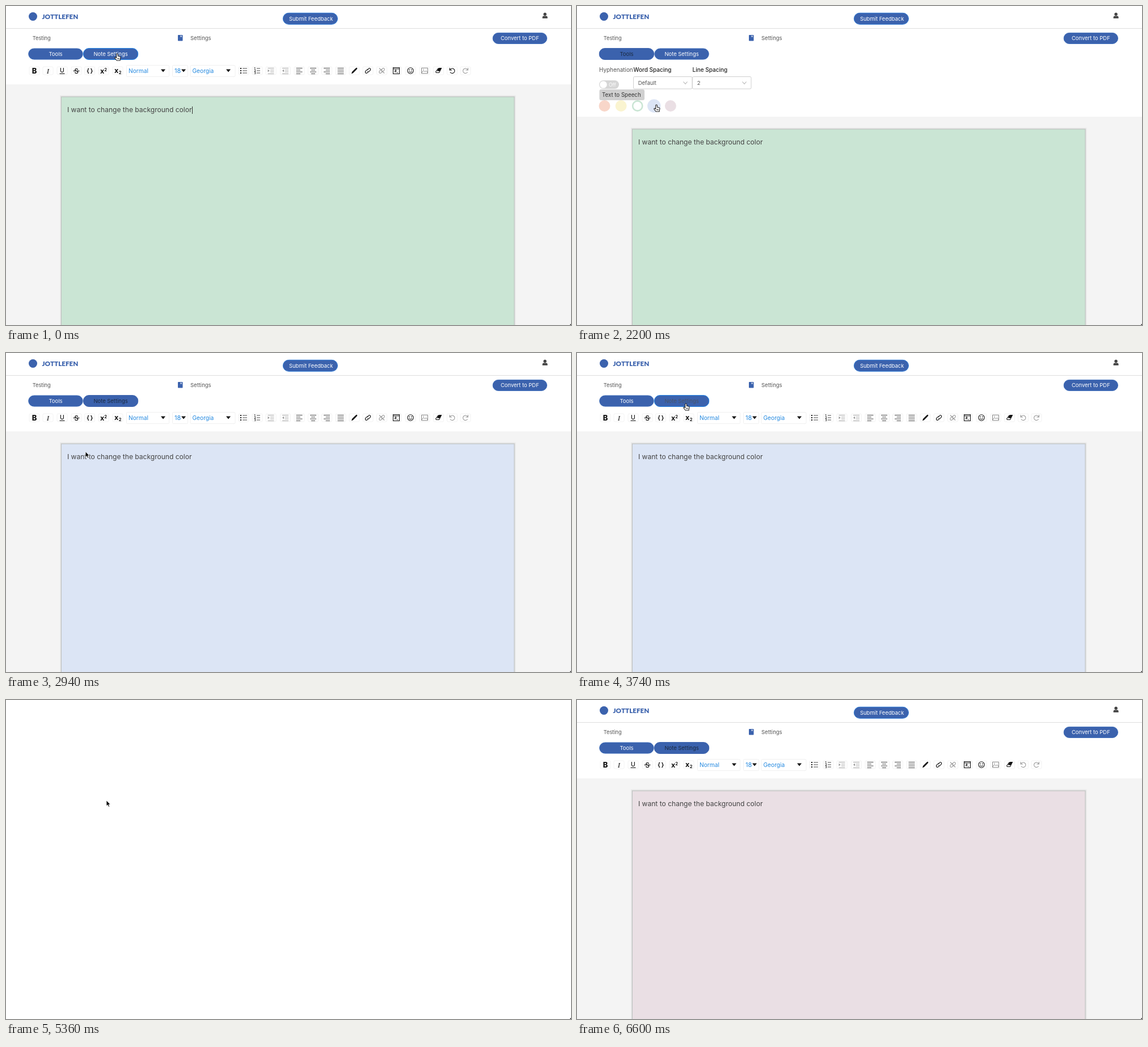
Recreate the animation shown at these times as an HTML page. Size 996x562 px, loop 7.14 s.

```html
<!DOCTYPE html>
<html lang="en">
<head>
<meta charset="utf-8">
<title>Note editor</title>
<style>
html, body { margin: 0; width: 100%; height: 100%; overflow: hidden; background: #fff; }
svg { display: block; width: 100vw; height: 100vh; }
text { font-family: Inter, Roboto, sans-serif; white-space: pre; }
.lato { font-family: Lato, "Open Sans", sans-serif; }
.mid { text-anchor: middle; }
.ico { fill: none; stroke: #111; stroke-width: 1.1; }
.dim { stroke: #999; }
.rule { stroke: #333; stroke-width: .9; }
.rule.dim { stroke: #999; }
</style>
</head>
<body>
<svg id="stage" viewBox="0 0 996 562"></svg>
<script>
const BLUE = '#3b62ad', EDGE = '#3a6ab8', LINK = '#2389e0', GREY = '#f4f4f4';
const SWATCHES = ['#f8d6c9', '#faf4d0', '#cae5d4', '#dce5f5', '#eadfe4'];
const LOOP = 7140;

const rect = (x, y, w, h, fill, more = '') =>
  `<rect x="${x}" y="${y}" width="${w}" height="${h}" fill="${fill}" ${more}/>`;
const text = (x, y, size, fill, s, more = '') =>
  `<text x="${x}" y="${y}" font-size="${size}" fill="${fill}" ${more}>${s}</text>`;
const path = (d, cls = '', more = '') => `<path class="ico ${cls}" d="${d}" ${more}/>`;
const at = (x, y, s) => `<g transform="translate(${x} ${y})">${s}</g>`;

const pill = (id, x, y, w, h, label, edge = EDGE, dx = 0) =>
  rect(x, y, w, h, BLUE, `id="${id}Box" rx="${h / 2}" stroke="${edge}"`) +
  text(x + w / 2 + dx, y + h / 2 + 3.2, 9.45, '#fff', label, `id="${id}Label" class="mid"`);

// stacked rules: each row is [left, right]
const rules = (rows, cls = '') =>
  path(rows.map(([a, b], i) => `M${a} ${i * 3.3 - 4.5}H${b}`).join(''), 'rule ' + cls);

function toolbar() {
  const glyph = (s, size, more = '') => text(0, 4.6, size, '#111', s, 'class="mid" ' + more);
  const L = -5.5, R = 5.5, wide = [L, R];
  const indent = tip => rules([wide, [-1, R], [-1, R], wide], 'dim') +
    `<path d="${tip}" fill="#999"/>`;
  const chain = cls => path('M-.5-2.2 1.4-4.1a2.2 2.2 0 0 1 3 3L2.3 1.1a2.2 2.2 0 0 1-3 0M.5 2.2-1.4 4.1a2.2 2.2 0 0 1-3-3L-2.3-1.1a2.2 2.2 0 0 1 3 0', cls);
  const turn = 'M-3.9-1.2A4.3 4.3 0 1 1-3.6 2.4M-4.4-5V-1H-.4';
  const icons = [
    [50, glyph('B', 13, 'font-weight="800"')],
    [74, glyph('I', 13, 'font-weight="500" style="font-family:Liberation Serif,serif" font-style="italic"')],
    [99, text(0, 3.2, 10.5, '#111', 'U', 'class="mid" font-weight="500"') + path('M-4.5 5.2H4.5')],
    [124, glyph('S', 12, 'font-weight="500"') + path('M-5.5.4H5.5')],
    [147.5, text(-5.5, 3.8, 11, '#111', '{', 'font-weight="600"') + text(1, 3.8, 11, '#111', '}', 'font-weight="600"')],
    [172, text(-6, 5, 12.5, '#111', 'x', 'font-weight="700"') + text(1.3, .5, 7.5, '#111', '2', 'font-weight="700"')],
    [197, text(-6, 4, 12.5, '#111', 'x', 'font-weight="700"') + text(1.7, 5.5, 7.5, '#111', '2', 'font-weight="700"')],
    [419, path('M-2-4H6M-2 0H6M-2 4H6', 'rule') + path('M-6-4h2M-6 0h2M-6 4h2', '', 'style="stroke-width:2"')],
    [443, path('M-1-4H5M-1 0H5M-1 4H5', 'rule') + ['1', '2', '3'].map((n, i) => text(-5.5, i * 4 - 2.3, 4.8, '#111', n, 'font-weight="700"')).join('')],
    [467, indent('M-5.5-2.5 -2.5 0 -5.5 2.5Z')],
    [492.5, indent('M-2.5-2.5 -5.5 0 -2.5 2.5Z')],
    [517, rules([wide, [L, 2], wide, [L, 2]])],
    [541.5, rules([wide, [-3.5, 3.5], wide, [-3.5, 3.5]])],
    [565.5, rules([wide, [-2, R], wide, [-2, R]])],
    [590, rules([wide, wide, wide, wide])],
    [614, '<path d="M-5 5.5-4 2 1.5-3.5 4-5.5 5.5-4 3.5-1.5-2 4Z" fill="#111"/>'],
    [638, chain('')],
    [662.5, chain('dim') + path('M-4.5-4.5 4.5 4.5', 'dim')],
    [688, path('M-5.5-5.5h11v11h-11ZM-5.5-3.3h11') + text(0, 3.3, 6, '#111', '#_', 'class="mid" font-weight="700"')],
    [713, path('M5.2 0A5.2 5.2 0 1 1-5.2 0A5.2 5.2 0 1 1 5.2 0M-2.8 1Q0 4.6 2.8 1') + path('M-2.6-1.5h1.6M1-1.5h1.6', '', 'style="stroke-width:1.6"')],
    [738, path('M-5.5-4.8h11v9.6h-11ZM-5 3.5-2-.5.5 2 2.5 0 5 3M-3-2.5h1.5', '', 'style="stroke:#777;stroke-width:.9"')],
    [762.5, path('M-5 2-1-3.5 1-4.5H5L1 3.5H-4Z') + '<path d="M-1-3.5 1-4.5H5L2.5.8H-2.5Z" fill="#111"/>'],
    [786.5, `<g id="undo">${path(turn)}</g>`],
    [810, `<g transform="scale(-1 1)">${path(turn, 'dim')}</g>`],
  ];
  const combo = (x, w, s, id, arrow, size = 10.2) =>
    rect(x + .5, 104.5, w, 20, '#fff', 'rx="2" stroke="#f0f0f0"') +
    text(x + 4, 118.3, size, LINK, s, `id="${id}"`) +
    `<path d="M${arrow} 111.5h8l-4 5Z" fill="#111"/>`;
  return icons.map(([x, s]) => at(x, 114, rect(-9, -7, 18, 14, '#fff', 'rx="2" stroke="#f2f2f2"') + s)).join('') +
    combo(212, 75, 'Normal', 'style', 273) + combo(293, 27, '18', 'size', 309, 11) + combo(324.5, 79, 'Georgia', 'font', 388);
}

function panel() {
  const select = (x, s) => rect(x, 124.5, 103.5, 21.5, '#fff', 'rx="2" stroke="#cfcfcf"') +
    text(x + 8.2, 139, 9.5, '#555', s) +
    path(`M${x + 88} 133.3l3.5 4 3.5-4`, '', 'style="stroke:#bbb"');
  return text(39, 115.5, 9.95, '#555', 'Hyphenation') +
    text(99.5, 115.5, 10, '#222', 'Word Spacing', 'font-weight="500"') +
    text(203.5, 115.5, 10, '#222', 'Line Spacing', 'font-weight="500"') +
    select(99.5, 'Default') + select(203.5, '2') +
    rect(39, 131, 35, 15, '#d6d6d6', 'rx="7.5"') + '<circle cx="46.5" cy="138.5" r="6.3" fill="#fff"/>' +
    text(56, 141.6, 8.6, '#fff', 'Off') +
    rect(39.5, 147, 79.5, 19, '#d0d0d0', 'rx="3"') + text(44, 160.2, 9.7, '#333', 'Text to Speech') +
    SWATCHES.map((c, i) => `<circle id="dot${i}" cx="${48.5 + i * 29.1}" cy="176"/>`).join('');
}

const $ = id => document.getElementById(id);
const set = (id, attrs) => { for (const k in attrs) $(id).setAttribute(k, attrs[k]); };
const show = (id, on) => set(id, { display: on ? 'inline' : 'none' });

$('stage').innerHTML = `
<g id="app">
  <g id="desk">${rect(0, 138, 996, 430, GREY)}
    ${[5, 3].map(w => rect(97.5, 160, 798.5, 460, 'none', `stroke="#000" stroke-opacity=".04" stroke-width="${w}"`)).join('')}
    ${rect(97.5, 160, 798.5, 460, GREY, 'id="page" stroke="#bcc0be"')}
    ${text(108, 187.4, 12.06, '#444', 'I want to change the background color', 'id="line"')}
    ${rect(328, 177, 1, 13, '#333', 'id="caret"')}
  </g>
  ${rect(0, 39, 996, 1, '#dedede')}
  <circle cx="47.5" cy="18.5" r="7.5" fill="${BLUE}"/>
  ${text(63.5, 22.9, 11.7, BLUE, 'JOTTLEFEN', 'class="lato" font-weight="900"')}
  ${pill('send', 488.3, 12.3, 96.2, 20, 'Submit Feedback', '#2f7bd6', 1.3)}
  ${pill('pdf', 858.2, 47.4, 95.3, 19, 'Convert to PDF')}
  <path d="M945.6 21.7v-1.6q0-2.7 2.7-2.7h3.6q2.7 0 2.7 2.7v1.6Z" fill="#444"/><circle cx="950.1" cy="14.4" r="2.7" fill="#444"/>
  <g id="loaded">${text(46.7, 60.3, 9.3, '#555', 'Testing')}${text(325, 60.3, 9.5, '#555', 'Settings')}</g>
  <g id="empty">${text(47, 64.5, 16.2, '#8a8a8a', 'Untitled', 'class="lato" font-style="italic"')}
    ${text(325, 60.5, 10.2, '#999', 'Category', 'class="lato" font-weight="500" letter-spacing=".25"')}</g>
  ${rect(303, 51, 8.5, 10.5, BLUE, 'id="book" rx=".8"')}<path d="M307.5 52h2.2v3.2l-1.1-.9-1.1.9Z" fill="#fff" opacity=".75"/>
  ${pill('tools', 39.7, 75, 95.5, 19, 'Tools')}
  ${pill('note', 136.8, 75, 95.5, 19, 'Note Settings')}
  <g id="bar">${toolbar()}</g>
  <g id="panel">${panel()}</g>
</g>
${rect(994.5, 560.5, 1.5, 1.5, '#111')}
<path id="hand" d="M-1.3 1.2a1.3 1.3 0 0 1 2.6 0V4.3L4.8 5q1.4.4 1.2 2L5.2 10V12H-.8L-4 8Q-4.6 6.4-3.1 6.2L-1.3 7.6ZM1 9.8V7.6M2.9 9.8V7.6" fill="#fff" stroke="#1c1c1c" stroke-width="1.05" stroke-linejoin="round"/>
<path id="arrow" d="M0 0V9.6L2.2 7.7 3.8 11.2 5.5 10.4 3.9 7.1H6.9Z" fill="#000" stroke="#fff" stroke-width=".7"/>`;

// pointer tip: [ms, x, y]
const TRACK = [
  [0, 196, 84], [60, 196, 84], [340, 104, 84], [560, 104, 84], [1040, 143, 169], [1200, 145, 170],
  [1440, 145, 170], [1500, 140, 174], [2920, 140, 174], [3600, 193, 101], [3740, 192, 89],
  [4000, 106, 84], [4200, 106, 84], [4580, 170, 176], [5320, 170, 176], [5360, 177, 177],
  [5580, 787, 63], [5770, 787, 63], [5930, 776, -16],
];
const within = (t, a, b) => t >= a && t < b;
const ramp = (t, a, d) => Math.max(0, Math.min(1, (t - a) / d));

function pointer(t) {
  const i = TRACK.findIndex(k => k[0] > t);
  if (i < 0) return TRACK[TRACK.length - 1].slice(1);
  const [a, x, y] = TRACK[i - 1], [b, u, v] = TRACK[i];
  let p = (t - a) / (b - a);
  p = p * p * (3 - 2 * p);
  return [x + (u - x) * p, y + (v - y) * p];
}

function tab(id, x, dark, big, hover) {
  const g = big ? .4 : 0, c = Math.round(255 - 228 * dark);
  set(id + 'Box', { x: x - g, y: 75 - g, width: 95.5 + 2 * g, height: 19 + 2 * g, stroke: hover ? '#1f83e8' : big ? BLUE : EDGE });
  set(id + 'Label', { fill: `rgb(${c},${c + Math.round(14 * dark)},${c + Math.round(36 * dark)})` });
}

function draw(t) {
  const open = within(t, 480, 2380) || within(t, 4120, 5340);
  const blank = within(t, 5340, 6200);
  const empty = within(t, 2380, 2600) || within(t, 6200, 6400);
  const color = t < 2380 ? 2 : t < 6200 ? 3 : 4;
  const [x, y] = pointer(t);
  const onTabs = y > 71 && y < 95;
  const onTools = onTabs && x < 136, onNote = onTabs && !onTools && x < 233;

  show('app', !blank);
  show('loaded', !empty);
  show('empty', empty);
  show('line', !empty);
  show('caret', t < 480);
  show('bar', !open);
  show('panel', open);
  set('desk', { transform: `translate(0 ${open ? 57 : 0})` });
  set('page', { fill: empty ? GREY : SWATCHES[color] });
  set('book', { fill: empty ? '#333' : BLUE });
  $('size').textContent = empty ? '14' : '18';
  $('font').textContent = empty ? 'Font' : 'Georgia';
  $('undo').firstChild.style.stroke = t < 480 ? '#111' : '#999';

  const noteDark = within(t, 2380, 5340) ? 1 - ramp(t, 3680, 300) : t >= 6200 ? 1 : 0;
  const toolsDark = !open || onTools ? 0 : t < 2380 ? ramp(t, 660, 300) : ramp(t, 4270, 250);
  tab('tools', 39.7, toolsDark, open || onTools, onTools);
  tab('note', 136.8, noteDark, !open || onNote, onNote);

  SWATCHES.forEach((c, i) => {
    const ring = i === color;
    const hover = i === 3 ? ramp(t, 960, 200) * (t < 2380) : i === 4 ? ramp(t, 4460, 150) : 0;
    set('dot' + i, {
      r: ring ? 8.6 : 10 + 1.7 * hover,
      fill: ring ? '#fff' : c, stroke: ring ? c : 'none', 'stroke-width': 2.6,
    });
  });

  const hand = !blank && (onTabs || within(y, 101, 124) || (open && y > 162) || t < 2940);
  const place = { transform: `translate(${x.toFixed(2)} ${y.toFixed(2)})` };
  set('hand', place);
  set('arrow', place);
  show('hand', hand);
  show('arrow', !hand && t < 5940);
}

const start = performance.now();
function tick(now) {
  draw(Math.max(0, now - start) % LOOP);
  requestAnimationFrame(tick);
}
draw(0);
requestAnimationFrame(tick);
</script>
</body>
</html>
```
